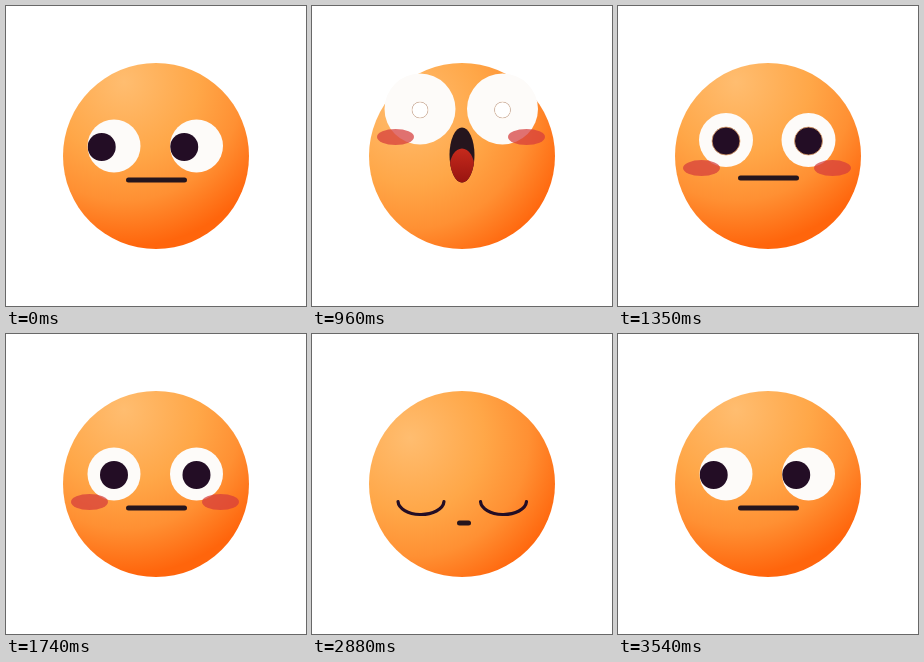
Write an HTML page with a canvas that moves like this. It is 300 by 300 pixels and loops after 4.08 s.

```html
<!DOCTYPE html>
<html lang="en">
<head>
<meta charset="utf-8">
<title>Startled emoji</title>
<style>
  html, body { margin: 0; width: 100%; height: 100%; overflow: hidden; background: #fff; }
  canvas { display: block; width: 300px; height: 300px; }
</style>
</head>
<body>
<canvas id="stage" width="300" height="300"></canvas>
<script>
const ctx = document.getElementById('stage').getContext('2d');
const LOOP = 4080;
const TAU = Math.PI * 2;
const INK = '#230d25';

const clamp = v => Math.max(0, Math.min(1, v));
const mix = (a, b, p) => a + (b - a) * p;
const easeIn = p => p * p;
const easeOut = p => 1 - (1 - p) ** 3;
const easeInOut = p => p * p * (3 - 2 * p);

// lid: -1 is fully open, 1 is closed. turn: how far the shading swings to the right.
const calm = {
  eyeY: 140, eyeR: 26.5, lid: -1, gaze: 0, pupilR: 14, glare: 0, rim: 0, blush: 1, turn: 0,
  mouthX: 150.5, mouthY: 174, mouthW: 61, mouthH: 5
};
const look = { ...calm, gaze: -12.3, blush: 0 };
const sleep = {
  ...look, eyeY: 166, lid: 1, turn: 1, mouthX: 152, mouthY: 189, mouthW: 14
};
const wake = {
  ...calm, eyeY: 159, lid: 0.83, blush: 0.2, turn: 1, glare: 1,
  mouthX: 150, mouthY: 203, mouthW: 28, mouthH: 14
};
const shock = {
  ...calm, eyeY: 103, eyeR: 35.5, pupilR: 8, glare: 1, rim: 0.35, turn: 1,
  mouthX: 150, mouthY: 149, mouthW: 25, mouthH: 55
};
const recover = { ...calm, eyeY: 134, eyeR: 27, rim: 0.8, mouthY: 172 };

const timeline = [
  [0, look], [430, sleep], [480, sleep],
  [570, wake, easeIn], [900, shock, easeOut], [1020, shock],
  [1350, recover], [1800, calm, easeOut], [2430, calm],
  [2860, sleep], [2910, sleep], [3540, look], [LOOP, look]
];

function poseAt(t) {
  const i = timeline.findIndex(key => key[0] > t);
  const [start, from] = timeline[i - 1];
  const [end, to, ease = easeInOut] = timeline[i];
  const p = ease((t - start) / (end - start));
  return Object.fromEntries(Object.keys(calm).map(k => [k, mix(from[k], to[k], p)]));
}

function oval(x, y, rx, ry, color) {
  ctx.beginPath();
  ctx.ellipse(x, y, rx, ry, 0, 0, TAU);
  ctx.fillStyle = color;
  ctx.fill();
}

function drawBody(turn) {
  const shade = ctx.createRadialGradient(
    mix(118, 98, turn), mix(76, 104, turn), 0,
    mix(118, 98, turn), mix(76, 104, turn), 165);
  shade.addColorStop(0, '#ffbd70');
  shade.addColorStop(0.45, '#ffa748');
  shade.addColorStop(0.72, '#ff9033');
  shade.addColorStop(1, '#ff650c');
  oval(150, 150, 93, 93, shade);
}

function drawEye(x, s) {
  ctx.save();
  ctx.beginPath();
  ctx.arc(x, s.eyeY, s.eyeR, 0, Math.PI);
  ctx.ellipse(x, s.eyeY, s.eyeR, s.eyeR * Math.abs(s.lid), 0, Math.PI, s.lid < 0 ? TAU : 0, s.lid > 0);
  ctx.fillStyle = '#fdfbf9';
  ctx.fill();
  ctx.clip();

  const px = x + s.gaze, py = s.eyeY + 1;
  oval(px, py, s.pupilR, s.pupilR, INK);
  ctx.globalAlpha = s.glare;
  oval(px, py, s.pupilR, s.pupilR, '#fff');
  ctx.globalAlpha = s.rim;
  ctx.strokeStyle = '#e5a56c';
  ctx.stroke();
  ctx.restore();

  const lash = clamp((s.lid - 0.85) / 0.15);
  if (!lash) return;
  ctx.save();
  ctx.globalAlpha = lash;
  ctx.beginPath();
  ctx.ellipse(x + 1, s.eyeY + 1, 23, 13.5, 0, 0.05, Math.PI - 0.05);
  ctx.lineWidth = 3.2;
  ctx.lineCap = 'round';
  ctx.strokeStyle = INK;
  ctx.stroke();
  ctx.restore();
}

function drawMouth({ mouthX: x, mouthY: y, mouthW: w, mouthH: h }) {
  ctx.save();
  ctx.beginPath();
  ctx.roundRect(x - w / 2, y - h / 2, w, h, { x: Math.min(w / 2, h * h / 10), y: h / 2 });
  ctx.fillStyle = '#25151d';
  ctx.fill();
  ctx.clip();
  ctx.globalAlpha = clamp((h - 5) / 30);
  const tongue = ctx.createLinearGradient(0, y - h * 0.12, 0, y + h / 2);
  tongue.addColorStop(0, '#c62a1c');
  tongue.addColorStop(1, '#981410');
  oval(x, y + h * 0.24, w / 2, h * 0.36, tongue);
  ctx.restore();
}

function draw(s) {
  ctx.clearRect(0, 0, 300, 300);
  drawBody(s.turn);
  drawEye(108, s);
  drawEye(190.5, s);
  ctx.globalAlpha = s.blush * 0.72;
  for (const x of [83.5, 214.5]) oval(x, s.eyeY + 28, 18.5, 8, '#d63c3c');
  ctx.globalAlpha = 1;
  drawMouth(s);
}

function tick() {
  draw(poseAt(performance.now() % LOOP));
  requestAnimationFrame(tick);
}
tick();
</script>
</body>
</html>
```
